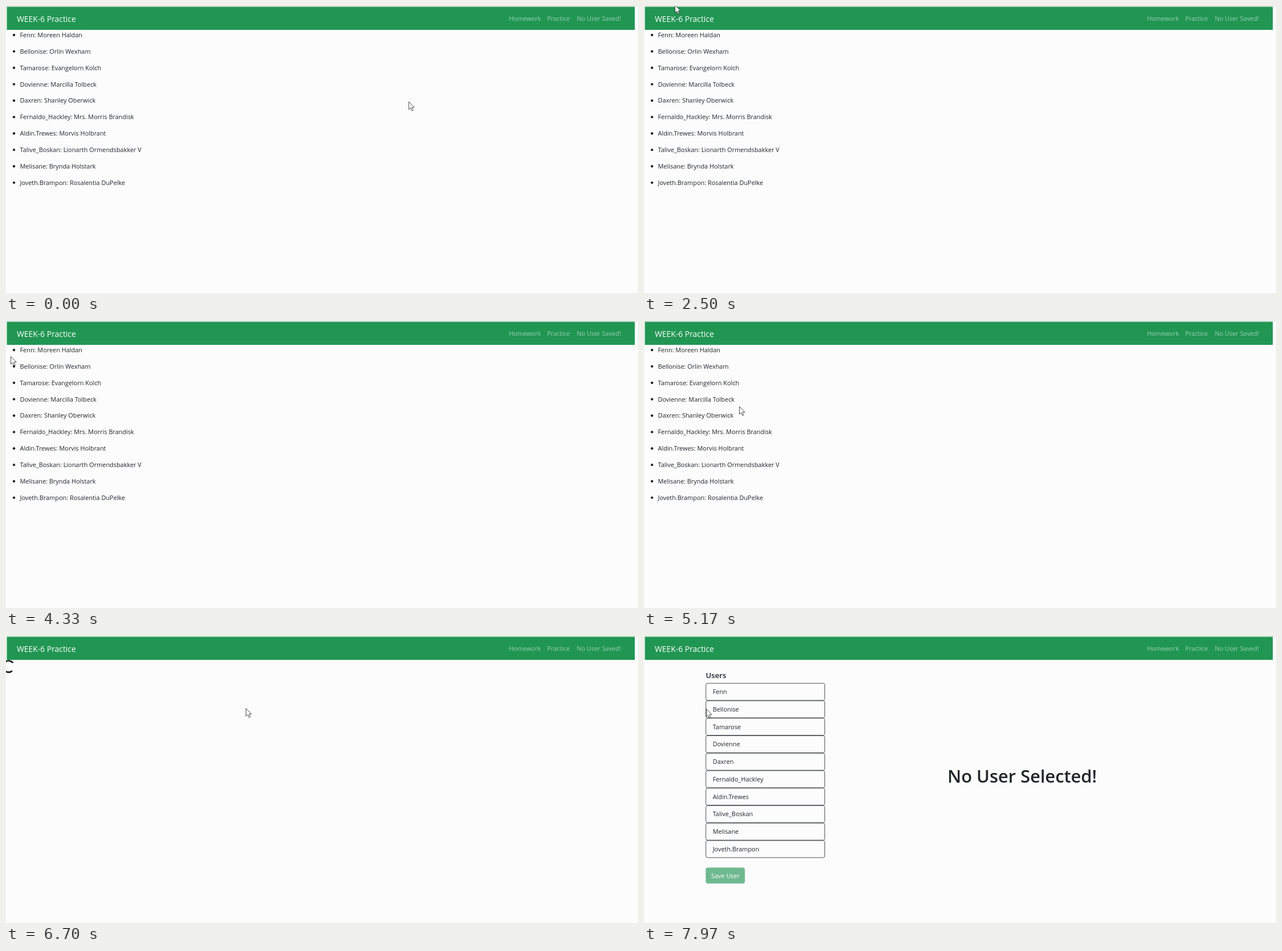
Animation, 1110 px wide and 505 px high, one loop 8 s. Source, as an HTML page with a canvas:

```html
<!DOCTYPE html>
<html lang="en">
<head>
<meta charset="utf-8">
<title>WEEK-6 Practice</title>
<style>
  html, body { margin: 0; width: 100%; height: 100%; overflow: hidden; background: #fcfcfc; }
  canvas { display: block; }
</style>
</head>
<body>
<canvas id="stage" width="1110" height="505"></canvas>
<script>
const ctx = document.getElementById('stage').getContext('2d');
const LOOP = 8000, LOADING = 1000, SPIN = 750;
const LIST_RELOAD = 2810, PICKER_OPEN = 6690;
const INK = '#212529', GREEN = '#219653', PAGE = '#fcfcfc';
const BODY_SIZE = 10.9;

const users = [
  ['Fenn', 'Moreen Haldan'],
  ['Bellonise', 'Orlin Wexham'],
  ['Tamarose', 'Evangelorn Kolch'],
  ['Dovienne', 'Marcilla Tolbeck'],
  ['Daxren', 'Shanley Oberwick'],
  ['Fernaldo_Hackley', 'Mrs. Morris Brandisk'],
  ['Aldin.Trewes', 'Morvis Holbrant'],
  ['Talive_Boskan', 'Lionarth Ormendsbakker V'],
  ['Melisane', 'Brynda Holstark'],
  ['Joveth.Brampon', 'Rosalentia DuPelke']
];

const brand = { text: 'WEEK-6 Practice', x: 19, w: 104 };
const links = [
  { text: 'Homework', x: 883.5, w: 57 },
  { text: 'Practice', x: 950.5, w: 41 },
  { text: 'No User Saved!', x: 1002.5, w: 80 }
];

// Each move eases the pointer to a new rest; sag bows the way downwards.
const home = { x: 708, y: 168 };
const moves = [
  { from: 430, to: 670, x: 470, y: 119, sag: 0 },
  { from: 900, to: 1700, x: 88, y: 62, sag: 80 },
  { from: 1700, to: 1800, x: 84, y: -25, sag: 0 },
  { from: 1800, to: 2500, x: 55, y: -2, sag: -60 },
  { from: 2500, to: 3300, x: 16, y: 52, sag: 0 },
  { from: 3800, to: 4330, x: 9, y: 62, sag: 0 },
  { from: 5000, to: 5700, x: 1070, y: 36, sag: 180 },
  { from: 5700, to: 5930, x: 962, y: 30, sag: 0 },
  { from: 6570, to: 6700, x: 422, y: 127, sag: 0 },
  { from: 6700, to: 7500, x: 110, y: 128, sag: 0 }
];

const arrow = new Path2D('M0 0V13.6L3.1 10.7L5.3 15.8L7.5 14.8L5.3 9.9H9.6Z');
const hand = new Path2D('M-1.4 1.4Q0 -.4 1.4 1.4V6.2Q2.8 5.2 3.9 6.8Q5.2 5.9 6 7.4Q7.4 6.8 7.6 8.6V12Q7 14.2 5.8 15.6V17H-1.6V15.8L-5.4 10.6Q-5.8 8.4 -3.6 9.3L-1.4 11Z');

const smooth = k => k * k * (3 - 2 * k);

function text(str, x, y, size = BODY_SIZE, color = INK, weight = 400) {
  ctx.font = `${weight} ${size}px "Open Sans", "Noto Sans", sans-serif`;
  ctx.fillStyle = color;
  ctx.fillText(str, x, y);
}

function roundBox(x, y, w, h, radius) {
  ctx.beginPath();
  ctx.roundRect(x, y, w, h, radius);
}

function pointerAt(t) {
  let { x, y } = home;
  for (const move of moves) {
    if (t < move.from) break;
    const k = smooth(Math.min(1, (t - move.from) / (move.to - move.from)));
    x += (move.x - x) * k;
    y += (move.y - y) * k + move.sag * 4 * k * (1 - k);
  }
  return { x, y };
}

const isOver = (p, item) =>
  p.x >= item.x && p.x <= item.x + item.w && p.y >= 10 && p.y <= 34;

function drawNav(pointer) {
  ctx.fillStyle = '#dfe1e1';
  ctx.fillRect(0, 0, 1110, 1);
  ctx.fillStyle = GREEN;
  ctx.fillRect(1.5, 1.4, 1102.9, 40.6);
  text(brand.text, brand.x, 28, 13.9, '#fff');
  for (const link of links) {
    const alpha = isOver(pointer, link) ? 0.8 : 0.55;
    text(link.text, link.x, 26, BODY_SIZE, `rgba(255,255,255,${alpha})`);
  }
}

function drawList() {
  users.forEach(([nick, name], i) => {
    const y = 51 + i * 28.87;
    ctx.fillStyle = INK;
    ctx.beginPath();
    ctx.arc(14, y, 2.2, 0, Math.PI * 2);
    ctx.fill();
    text(`${nick}: ${name}`, 24.5, Math.round(y + 4));
  });
}

function drawSpinner(elapsed) {
  const turn = elapsed / SPIN * Math.PI * 2;
  ctx.strokeStyle = INK;
  ctx.lineWidth = 2.9;
  ctx.beginPath();
  ctx.arc(4.5, 53.7, 10.1, turn + Math.PI / 4, turn + Math.PI * 7 / 4);
  ctx.stroke();
}

function drawPicker() {
  text('Users', 108.5, 74, 13.2, INK, 600);
  ctx.strokeStyle = INK;
  ctx.lineWidth = 0.8;
  users.forEach(([nick], i) => {
    const y = 83.2 + i * 30.75;
    roundBox(108.7, y, 208.8, 30, 3);
    ctx.stroke();
    text(nick, 120.7, Math.round(y + 18.8));
  });
  ctx.fillStyle = '#6fb990';
  roundBox(108.4, 407.5, 68.8, 28, 4);
  ctx.fill();
  text('Save User', 118, 426, BODY_SIZE, '#fff');
  text('No User Selected!', 533, 258, 30.9, INK, 600);
}

function drawPointer(p) {
  const overLink = [brand, ...links].some(item => isOver(p, item));
  const shape = overLink ? hand : arrow;
  ctx.save();
  ctx.translate(Math.round(p.x) - 0.5, Math.round(p.y) + 0.5);
  ctx.fillStyle = '#fff';
  ctx.fill(shape);
  ctx.strokeStyle = '#222';
  ctx.lineWidth = 0.8;
  ctx.stroke(shape);
  if (overLink) {
    ctx.beginPath();
    for (const x of [1.4, 3.8, 6]) {
      ctx.moveTo(x, 6.5);
      ctx.lineTo(x, 9.5);
    }
    ctx.stroke();
  }
  ctx.restore();
}

function drawBody(t) {
  const opened = [LIST_RELOAD, PICKER_OPEN].find(start => t >= start && t < start + LOADING);
  if (opened) drawSpinner(t - opened);
  else if (t < PICKER_OPEN) drawList();
  else drawPicker();
}

function render(now) {
  const t = now % LOOP;
  const pointer = pointerAt(t);
  ctx.fillStyle = PAGE;
  ctx.fillRect(0, 0, 1110, 505);
  drawNav(pointer);
  drawBody(t);
  drawPointer(pointer);
}

const begin = performance.now();
function tick() {
  render(performance.now() - begin);
  requestAnimationFrame(tick);
}
tick();
</script>
</body>
</html>
```
